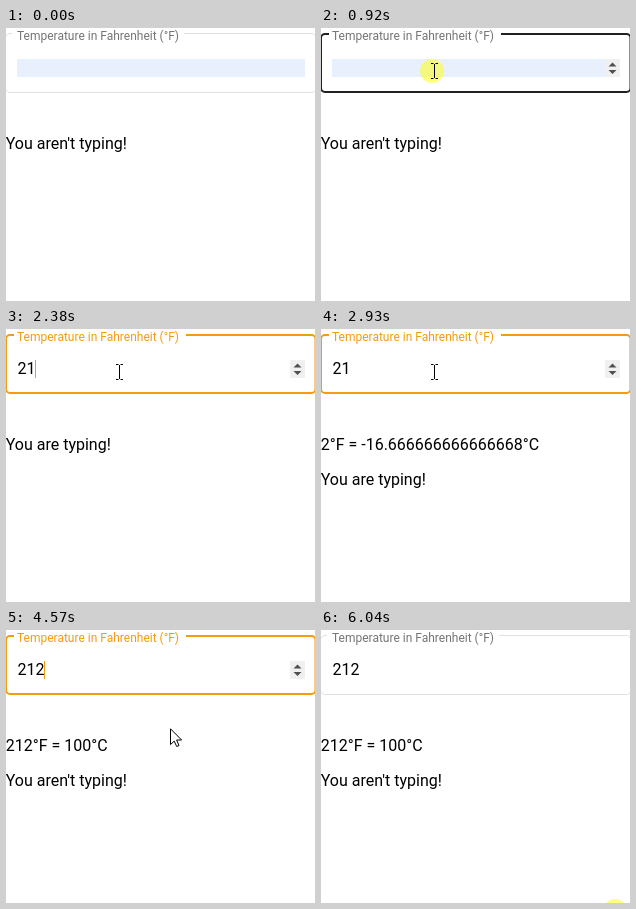
An HTML page that plays this animation: 309 by 273 pixels, repeating every 6.11 s.

```html
<!DOCTYPE html>
<html lang="en">
<head>
<meta charset="utf-8">
<title>Temperature converter</title>
<style>
  html, body { margin: 0; width: 100%; height: 100%; overflow: hidden; background: #fff; }
  svg { display: block; width: 309px; height: 273px; font: 16px Roboto, sans-serif; }
  #label { font-size: 12px; }
</style>
</head>
<body>
<svg viewBox="0 0 309 273">
  <rect id="fill" x="11" y="31" width="288" height="18" fill="#e8f0fe"/>
  <path id="outline" fill="none"/>
  <text id="label" x="11" y="12">Temperature in Fahrenheit (°F)</text>
  <text id="value" x="11.5" y="45"></text>
  <rect id="caret" y="31" width="1" height="18" fill="#f39c12"/>
  <g id="spinner">
    <rect x="284" y="31" width="15" height="18" fill="#f0f0f0"/>
    <path d="M287.5 38.5l4-4 4 4zM287.5 42l4 4 4-4z" fill="#505050"/>
  </g>
  <text id="result" x="-.3" y="121"></text>
  <text id="status" x="-.3"></text>
  <circle id="press" r="12" fill="#ff0" fill-opacity=".5"/>
  <g id="cursor">
    <path id="beam" fill="none" stroke="#000"
      d="M-3 -7.5H-.5M1.5 -7.5H4M.5 -7V7M-3 7.5H-.5M1.5 7.5H4"/>
    <path id="arrow" fill="#fff" stroke="#000"
      d="M.5 .8V16.6L4.2 13.1L6.7 18.5L9 17.5L6.6 12H11.6Z"/>
  </g>
</svg>
<script>
const LOOP = 6110, ENTER = 230, PRESS = 920, FOCUS = 1000, RELEASE = 1080, LEAVE = 4333, BLUR = 6040;
const STEP = 77;    // the pointer moves once per step
const BLINK = 530;  // caret half period
const INPUT = '212';
const ORANGE = '#f39c12';

// Per keystroke: when it lands, when the page notices, when the result settles.
const keys = [
  { typed: 1540, noticed: 2380, settled: 2550 },
  { typed: 2380, noticed: 2850, settled: 3080 },
  { typed: 3170, noticed: 3390, settled: 3860 }
];

const el = {};
document.querySelectorAll('[id]').forEach(node => el[node.id] = node);

const show = (node, on) => node.setAttribute('display', on ? 'inline' : 'none');
const mix = (a, b, s) => Math.round(a + (b - a) * s);

function set(node, attrs) {
  for (const name in attrs) node.setAttribute(name, attrs[name]);
}

// Share of a glide done, held still within each step.
function progress(t, start, steps) {
  return Math.min(Math.max(Math.floor((t - start) / STEP) / steps, 0), 1);
}

function pointerAt(t) {
  if (t < LEAVE) {
    const s = 1 - (1 - progress(t, ENTER, 7)) ** 2;
    return [mix(297, 113, s), mix(172, 43, s)];
  }
  const u = progress(t, LEAVE, 9.6), s = u * u * (3 - 2 * u);
  return [mix(113, 296, s ** .88), mix(43, 281, s)];
}

// Rounded box with a notch for the label, both sides just past the stage.
function outlinePath(width) {
  const h = width / 2, l = -1 + h, r = 310.5 - h, t = 5 + h, b = 65 - h, q = 5 - h;
  const shift = width > 1 ? 2 : 0;
  return `M${178 + shift} ${t}H${r - q}a${q} ${q} 0 0 1 ${q} ${q}V${b - q}` +
    `a${q} ${q} 0 0 1 ${-q} ${q}H${l + q}a${q} ${q} 0 0 1 ${-q} ${-q}V${t + q}` +
    `a${q} ${q} 0 0 1 ${q} ${-q}H${6 + shift}`;
}

function drawField(t, hovered) {
  const focused = t >= FOCUS && t < BLUR;
  const active = focused || hovered;
  const width = active ? 2 : 1;
  set(el.outline, {
    d: outlinePath(width),
    'stroke-width': width,
    stroke: focused ? ORANGE : hovered ? '#212121' : '#e0e0e0'
  });
  set(el.label, { fill: focused ? ORANGE : '#757575' });
  show(el.spinner, active);

  const typed = keys.filter(key => key.typed <= t);
  const since = typed.length ? typed[typed.length - 1].typed : FOCUS;
  el.value.textContent = INPUT.slice(0, typed.length);
  show(el.fill, !typed.length);
  set(el.caret, { x: 11 + 9 * typed.length });
  show(el.caret, focused && Math.floor((t - since) / BLINK) % 2 === 0);
}

function drawOutput(t) {
  const settled = keys.filter(key => key.settled <= t).length;
  const typing = keys.some(key => t >= key.noticed && t < key.settled);
  const degrees = INPUT.slice(0, settled);
  el.result.textContent = settled ? `${degrees}°F = ${(degrees - 32) * 5 / 9}°C` : '';
  el.status.textContent = typing ? 'You are typing!' : "You aren't typing!";
  set(el.status, { y: settled ? 156 : 121 });
}

function drawPointer(t, x, y, hovered) {
  set(el.cursor, { transform: `translate(${x} ${y})` });
  show(el.cursor, t >= ENTER);
  show(el.beam, hovered);
  show(el.arrow, !hovered);
  set(el.press, { cx: x - 2, cy: y });
  show(el.press, (t >= PRESS && t < RELEASE) || t >= BLUR);
}

function render(t) {
  const [x, y] = pointerAt(t);
  const hovered = y < 65;
  drawField(t, hovered);
  drawOutput(t);
  drawPointer(t, x, y, hovered);
}

const start = performance.now();
function tick() {
  render((performance.now() - start) % LOOP);
  requestAnimationFrame(tick);
}
tick();
</script>
</body>
</html>
```
